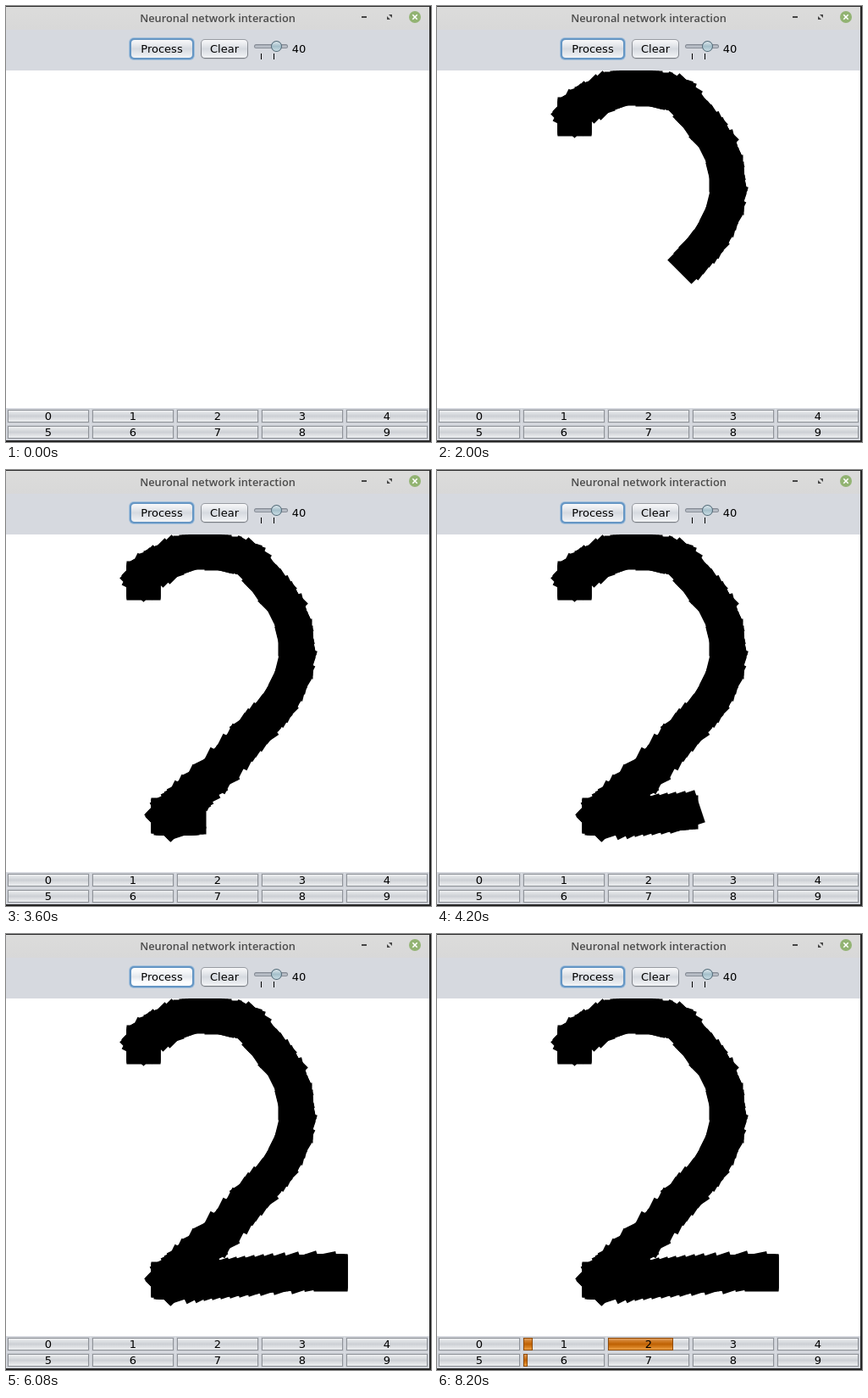
Recreate the animation shown at these times as an HTML page with a canvas. Size 502x514 px, loop 8280 ms.

```html
<!DOCTYPE html>
<html lang="en">
<head>
<meta charset="utf-8">
<title>Neuronal network interaction</title>
<style>
html, body { margin: 0; width: 100%; height: 100%; overflow: hidden; }
canvas { display: block; }
</style>
</head>
<body>
<canvas id="stage" width="502" height="514"></canvas>
<script>
const ctx = document.getElementById('stage').getContext('2d');
const LOOP = 8280, TICK = 40, PEN = 40, SAMPLE = 20;
const UI_FONT = '13px "DejaVu Sans", sans-serif';
const PANEL = '#d6d9df';

// Pen positions: time, x, y
const keys = [
  [120, 162, 133], [230, 163, 125], [330, 172, 117], [450, 186, 109],
  [560, 201, 102], [670, 219, 97], [790, 240, 96], [900, 262, 99],
  [1000, 281, 104], [1060, 293, 114], [1120, 304, 127], [1240, 320, 146],
  [1340, 332, 165], [1440, 339, 186], [1540, 342, 207], [1630, 342, 224],
  [1720, 338, 240], [1820, 328, 262], [1910, 315, 282], [2000, 300, 299],
  [2180, 280, 321], [2400, 260, 343], [2600, 241, 362], [2800, 222, 380],
  [3050, 205, 395], [3200, 194, 403], [3300, 191, 407], [3400, 196, 410],
  [3600, 216, 409], [3900, 252, 406], [4320, 307, 401], [4700, 362, 398],
  [4800, 380, 397], [4840, 383, 398], [4880, 383, 401]
];
const outputs = { 1: 0.11, 2: 0.8, 6: 0.05 };

// Catmull-Rom position, rounded to whole pixels like mouse events
function penAt(t) {
  let i = 0;
  while (i < keys.length - 2 && keys[i + 1][0] <= t) i++;
  const a = keys[Math.max(i - 1, 0)], b = keys[i], c = keys[i + 1];
  const d = keys[Math.min(i + 2, keys.length - 1)];
  const u = (t - b[0]) / (c[0] - b[0]);
  return [1, 2].map(k => Math.round(b[k] + u / 2 * (c[k] - a[k] +
    u * (2 * a[k] - 5 * b[k] + 4 * c[k] - d[k] +
    u * (3 * (b[k] - c[k]) + d[k] - a[k])))));
}

const trail = [];
for (let t = keys[0][0]; t <= keys[keys.length - 1][0]; t += SAMPLE) {
  trail.push([t, ...penAt(t)]);
}

function rect(x, y, w, h, fill) {
  ctx.fillStyle = fill;
  ctx.fillRect(x, y, w, h);
}

function gradient(y, h, ...colors) {
  const g = ctx.createLinearGradient(0, y, 0, y + h);
  colors.forEach((c, i) => g.addColorStop(i / (colors.length - 1), c));
  return g;
}

function roundBox(x, y, w, h, r, fill) {
  ctx.fillStyle = fill;
  ctx.beginPath();
  ctx.roundRect(x, y, w, h, r);
  ctx.fill();
}

function disc(x, y, r, fill) {
  ctx.fillStyle = fill;
  ctx.beginPath();
  ctx.arc(x, y, r, 0, 2 * Math.PI);
  ctx.fill();
}

function shape(fill, ...points) {
  ctx.fillStyle = fill;
  ctx.beginPath();
  points.forEach(p => ctx.lineTo(...p));
  ctx.fill();
}

function label(text, x, y, font = UI_FONT, color = '#000') {
  ctx.font = font;
  ctx.fillStyle = color;
  ctx.textAlign = 'center';
  ctx.fillText(text, x, y);
}

function button(text, x, w, focused, hover) {
  const y = 39, h = 23;
  if (focused) {
    roundBox(x - 2, y - 2, w + 4, h + 4, 6, '#a3c0dc');
    roundBox(x - 1, y - 1, w + 2, h + 2, 5, '#6596c4');
  } else {
    roundBox(x, y + 1, w, h, 5, '#c3c7cd');
    roundBox(x, y, w, h, 5, gradient(y, h, '#999da3', '#777b82'));
  }
  const fill = hover
    ? gradient(y, h, '#ffffff', '#f5f7f9', '#e4e8ed', '#fbfcfd', '#ffffff')
    : gradient(y, h, '#fbfbfc', '#eaecef', '#d6dae0', '#e5e8ec', '#f5f6f8');
  roundBox(x + 1, y + 1, w - 2, h - 2, 4, fill);
  label(text, x + w / 2, 55);
}

function titleBar() {
  rect(0, 0, 500, 28, gradient(0, 28, '#dcdcdb', '#d8d8d8'));
  rect(0, 0, 502, 1, '#2c2c2c');
  label('Neuronal network interaction', 250, 19,
    '600 12.8px "Open Sans", sans-serif', '#4b4b4b');
  rect(420, 12, 6, 2, '#444');
  shape('#444', [452, 10], [456, 10], [456, 14]);
  shape('#444', [450, 12], [450, 16], [454, 16]);
  disc(483, 13, 7, '#92b372');
  ctx.strokeStyle = '#fff';
  ctx.lineWidth = 1.6;
  ctx.lineCap = 'butt';
  ctx.beginPath();
  ctx.moveTo(480.3, 10.3);
  ctx.lineTo(485.7, 15.7);
  ctx.moveTo(485.7, 10.3);
  ctx.lineTo(480.3, 15.7);
  ctx.stroke();
}

function toolBar(hover) {
  rect(0, 28, 500, 48, PANEL);
  button('Process', 147, 74, true, hover);
  button('Clear', 230, 56, false, false);
  roundBox(293, 45, 40, 5, 2.5, '#858b95');
  roundBox(294, 46, 38, 3, 1.5, gradient(46, 3, '#a4aab4', '#c4c9d1'));
  disc(319.5, 47.5, 6.5, '#4f6876');
  disc(319.5, 47.5, 5.5, gradient(42, 11, '#dce7ec', '#a5c0cb', '#c9dce3'));
  rect(301, 56, 1, 7, '#000');
  rect(316, 56, 1, 7, '#000');
  label('40', 346, 55);
}

function drawing(t) {
  rect(0, 76, 500, 398, '#fff');
  ctx.save();
  ctx.beginPath();
  ctx.rect(0, 76, 500, 398);
  ctx.clip();
  ctx.strokeStyle = '#000';
  ctx.lineWidth = PEN;
  ctx.lineCap = 'square';
  for (let i = 1; i < trail.length && trail[i][0] <= t; i++) {
    const [, x0, y0] = trail[i - 1], [, x1, y1] = trail[i];
    if (x0 === x1 && y0 === y1) continue;
    ctx.beginPath();
    ctx.moveTo(x0 + 0.5, y0 + 0.5);
    ctx.lineTo(x1 + 0.5, y1 + 0.5);
    ctx.stroke();
  }
  ctx.restore();
}

function outputBar(digit, level) {
  const x = 2 + digit % 5 * 100, y = digit < 5 ? 476 : 495;
  rect(x - 1, y - 1, 98, 17, '#c9ccd2');
  rect(x, y, 96, 15, '#8f9399');
  rect(x + 1, y + 1, 94, 13,
    gradient(y + 1, 13, '#eff0f2', '#dcdfe2', '#cdd0d5', '#dfe1e4', '#eceef0'));
  const w = Math.round(96 * level);
  if (w > 0) {
    rect(x, y, w, 15, '#8f4a08');
    rect(x + 1, y + 1, w - 2, 13,
      gradient(y + 1, 13, '#e0a062', '#cf7a24', '#bf6204', '#d47d1e', '#eda044'));
  }
  label(digit, x + 48, y + 12);
}

function render(t) {
  rect(0, 0, 502, 514, '#262626');
  titleBar();
  toolBar(t >= 5760 && t < 7400);
  drawing(t);
  rect(0, 474, 500, 38, PANEL);
  const u = Math.min(Math.max((t - 6120) / 600, 0), 1);
  const grow = 1 - (1 - u) ** 3;
  for (let d = 0; d < 10; d++) outputBar(d, (outputs[d] || 0) * grow);
}

const start = performance.now();
function frame() {
  const t = (performance.now() - start) % LOOP;
  render(t - t % TICK);
  requestAnimationFrame(frame);
}
frame();
</script>
</body>
</html>
```
